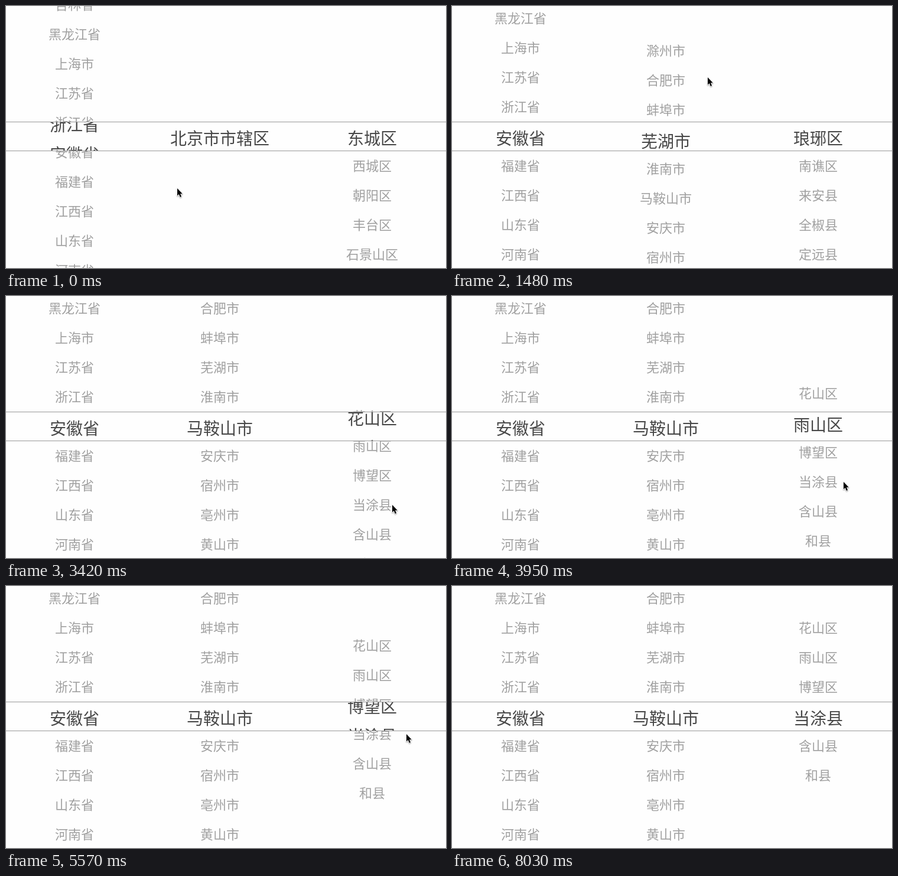
Animation of 745 by 444 pixels, one loop 8.87 s. Source, as an HTML page with a canvas:

```html
<!DOCTYPE html>
<html lang="zh-CN">
<head>
<meta charset="utf-8">
<style>
  html, body { margin: 0; width: 100%; height: 100%; overflow: hidden; background: #fefefe; }
  canvas { display: block; }
</style>
</head>
<body>
<canvas id="stage" width="745" height="444"></canvas>
<script>
const ctx = document.getElementById('stage').getContext('2d');
const WIDTH = 745, HEIGHT = 444, LOOP = 8870;
const ROW = 50, BAND_TOP = 196, BAND_BOTTOM = 245;
const list = names => names.split(' ');

const provinces = list('吉林省 黑龙江省 上海市 江苏省 浙江省 安徽省 福建省 江西省 山东省 河南省 湖北省');
const beijing = list('北京市市辖区');
const anhui = list('滁州市 合肥市 蚌埠市 芜湖市 淮南市 马鞍山市 安庆市 宿州市 亳州市 黄山市 六安市');
const dongcheng = list('东城区 西城区 朝阳区 丰台区 石景山区 海淀区');
const chuzhou = list('琅琊区 南谯区 来安县 全椒县 定远县 凤阳县');
const maanshan = list('花山区 雨山区 博望区 当涂县 含山县 和县');

const progress = (t, start, end) => Math.min(1, Math.max(0, (t - start) / (end - start)));
const mix = (a, b, p) => a + (b - a) * p;

// Linear path through [time, value] points, held at both ends.
function follow(points, t) {
  let value = points[0][1];
  for (let i = 1; i < points.length; i++) {
    const [start] = points[i - 1], [end, target] = points[i];
    value = mix(value, target, progress(t, start, end));
  }
  return Math.round(value);
}

const provinceScroll = t => Math.round(27 * (1 - progress(t, 60, 260)) ** 2) - 5 * ROW;
const cityScroll = t => follow(
  [[500, 0], [1420, -123], [1480, -145], [1840, -232], [2370, -243], [2740, -250]], t);
const districtScroll = t => follow(
  [[3190, 0], [3950, -56], [5050, -92], [5690, -127], [6100, -128], [6860, -149], [7270, -150]], t);

function travel(t, start, end, from, to) {
  const p = progress(t, start, end);
  return from.map((v, i) => mix(v, to[i], p));
}

// While dragging, the pointer moves with the list it holds.
const holdCity = t => [418 - 0.1 * cityScroll(t), 266 + cityScroll(t)];
const holdDistrict = t => [650 - 0.235 * districtScroll(t), 371 + districtScroll(t)];

function pointerAt(t) {
  const rest = [447, 74];
  if (t < 500) return travel(t, 60, 320, [290, 309], holdCity(0));
  if (t <= 1480) return holdCity(t);
  if (t < 2480) return travel(t, 1480, 1840, holdCity(1480), rest);
  if (t < 3190) return travel(t, 2480, 3070, rest, holdDistrict(0));
  if (t < 7750) return holdDistrict(t);
  return travel(t, 7750, 7970, holdDistrict(t), [704, 338]);
}

function drawRows(columns, size, color, baseline, areas) {
  ctx.save();
  ctx.beginPath();
  for (const [top, bottom] of areas) ctx.rect(0, top, WIDTH, bottom - top);
  ctx.clip();
  ctx.font = `${size}px "Noto Sans CJK SC", "Noto Sans CJK", sans-serif`;
  ctx.textAlign = 'center';
  ctx.fillStyle = color;
  for (const { x, names, scroll } of columns) {
    names.forEach((name, i) => ctx.fillText(name, x, baseline + i * ROW + scroll));
  }
  ctx.restore();
}

const arrow = new Path2D('M0 0V12.6L2.8 10L4.9 15L7 14.1L5 9.3H8.8Z');

function drawPointer([x, y]) {
  ctx.save();
  ctx.translate(Math.round(x), Math.round(y));
  ctx.lineWidth = 1.6;
  ctx.lineJoin = 'round';
  ctx.strokeStyle = '#fff';
  ctx.shadowColor = 'rgba(0,0,0,.4)';
  ctx.shadowBlur = 2;
  ctx.shadowOffsetY = 1;
  ctx.stroke(arrow);
  ctx.shadowColor = 'transparent';
  ctx.fillStyle = '#000';
  ctx.fill(arrow);
  ctx.restore();
}

function draw(t) {
  const columns = [
    { x: 116, names: provinces, scroll: provinceScroll(t) },
    { x: 362, names: t < 320 ? beijing : anhui, scroll: cityScroll(t) },
    { x: 620, names: t < 320 ? dongcheng : t < 2780 ? chuzhou : maanshan, scroll: districtScroll(t) }
  ];
  ctx.fillStyle = '#fefefe';
  ctx.fillRect(0, 0, WIDTH, HEIGHT);
  drawRows(columns, 22, '#a0a0a0', 229, [[0, BAND_TOP], [BAND_BOTTOM + 1, HEIGHT]]);
  drawRows(columns, 28, '#484848', 235, [[BAND_TOP + 1, BAND_BOTTOM]]);
  ctx.fillStyle = '#999';
  ctx.fillRect(0, BAND_TOP, WIDTH, 1);
  ctx.fillRect(0, BAND_BOTTOM, WIDTH, 1);
  if (t < 8020) drawPointer(pointerAt(t));
}

const begin = performance.now();
function tick() {
  draw((performance.now() - begin) % LOOP);
  requestAnimationFrame(tick);
}
tick();
</script>
</body>
</html>
```
